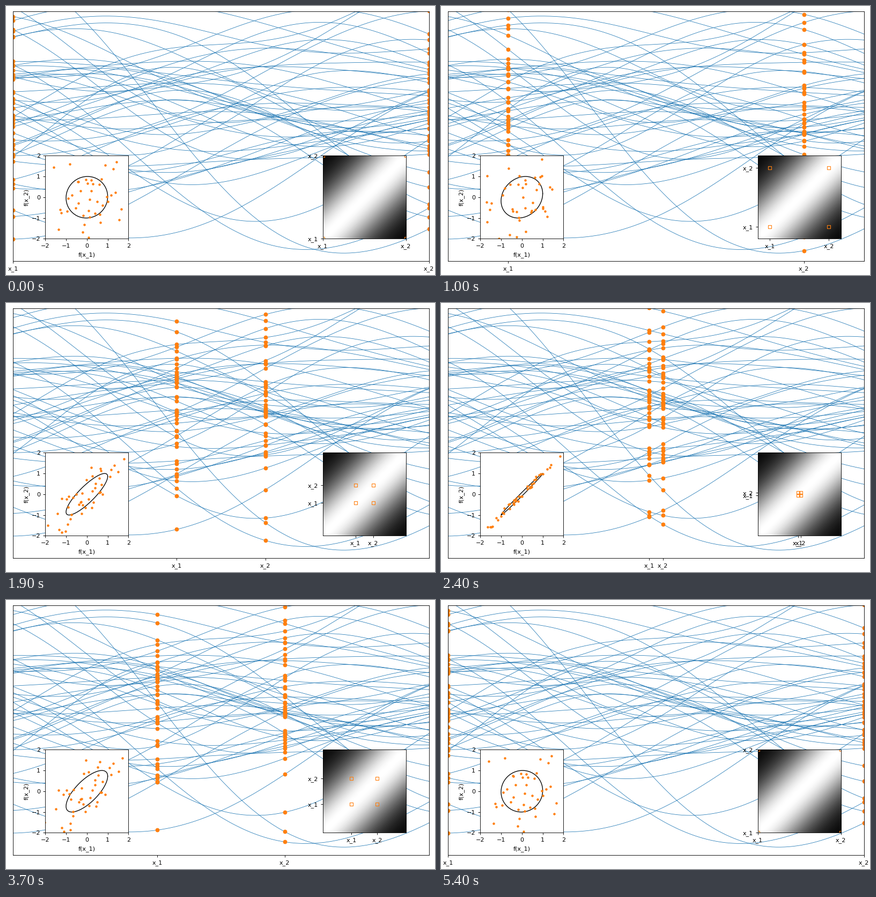
These frames come from a looping animation (800 by 502 pixels, 5500 ms). A matplotlib script:

```python
import numpy as np
import matplotlib.pyplot as plt
from matplotlib.animation import FuncAnimation

W, H, DPI = 800, 502, 80
FRAMES, INTERVAL = 55, 100
LENGTH = 0.38  # length scale of the kernel
KNOTS = np.array([0, 0.35, 0.65, 1])
MEAN, SPREAD = 182, 92  # height of the main curves in pixels
NAMES = ["x_1", "x_2"]

rng = np.random.default_rng(4)


def kernel(a, b):
    return np.exp(-0.5 * (np.subtract.outer(a, b) / LENGTH) ** 2)


COV = kernel(KNOTS, KNOTS)


def draw(count):
    """Knot values of smooth random functions, one column each."""
    z = rng.standard_normal((len(KNOTS), count))
    z -= z.mean(axis=1, keepdims=True)
    z /= z.std(axis=1, keepdims=True)
    return np.linalg.cholesky(COV) @ z


def evaluate(x, values):
    return kernel(x, KNOTS) @ np.linalg.solve(COV, values)


def add_box(left, top, right, bottom):
    box = [left / W, 1 - bottom / H, (right - left) / W, (bottom - top) / H]
    return fig.add_axes(box)


# The four curves that dip lowest, then random ones
low = np.array([(381, 429, 327, 160), (435, 339, 210, 135),
                (-70, 195, 431, 416), (110, 317, 451, 377)]).T
curves = np.hstack([low - MEAN, SPREAD * draw(44)])
samples = draw(45)

plt.rcParams.update({"font.family": "DejaVu Sans",
                     "xtick.major.pad": 4.5, "ytick.major.pad": 4.5})
fig = plt.figure(figsize=(W / DPI, H / DPI), dpi=DPI)

# Sample functions
main = add_box(13, 10.2, 788.8, 476.2)
grid = np.linspace(0, 1, 200)
main.plot(grid, MEAN + evaluate(grid, curves), color="C0", lw=0.7)
main.set(xlim=(0, 1), ylim=(476.2, 10.2), yticks=[])
dots = [main.plot([], [], "o", color="C1", ms=6, zorder=2.3)[0] for _ in NAMES]

# Joint distribution of the two values
joint = add_box(73.2, 279.4, 228.4, 434.4)
ellipse, = joint.plot([], [], color="black", lw=1.2)
cloud, = joint.plot([], [], ".", color="C1", ms=6)
joint.set(xlim=(-2, 2), ylim=(-2, 2), xticks=range(-2, 3), yticks=range(-2, 3))
joint.set_xlabel("f(x_1)", labelpad=5)
joint.set_ylabel("f(x_2)")

# Covariance
cov = add_box(590.7, 279.4, 745.8, 434.4)
cov.imshow(kernel(grid, grid), cmap="gray", origin="lower", extent=(0, 1, 0, 1),
           vmin=0, vmax=1, aspect="auto")
squares, = cov.plot([], [], "s", mfc="none", mec="C1", ms=5)
cov.set(xlim=(0, 1), ylim=(0, 1))

turn = np.linspace(0, 2 * np.pi, 120)


def update(i):
    # The points meet in the middle and part again, a little faster later on
    phase = np.interp(i, [0, 14, 54], [0, 1.589, 6.33])
    a = (1 - np.cos(phase)) / 4
    pair = np.array([a, 1 - a])

    for dot, x, y in zip(dots, pair, MEAN + evaluate(pair, curves)):
        dot.set_data(np.full(len(y), x), y)
    cloud.set_data(*evaluate(pair, samples))

    rho = kernel(pair, pair)[0, 1]
    ellipse.set_data(np.cos(turn),
                     rho * np.cos(turn) + np.sqrt(1 - rho**2) * np.sin(turn))

    squares.set_data(np.tile(pair, 2), np.repeat(pair, 2))
    main.set_xticks(pair, labels=NAMES)
    cov.set_xticks(pair, labels=NAMES)
    cov.set_yticks(pair, labels=NAMES)
    return []


anim = FuncAnimation(fig, update, frames=FRAMES, interval=INTERVAL,
                     repeat=True, repeat_delay=0, blit=False)
plt.show()
```
